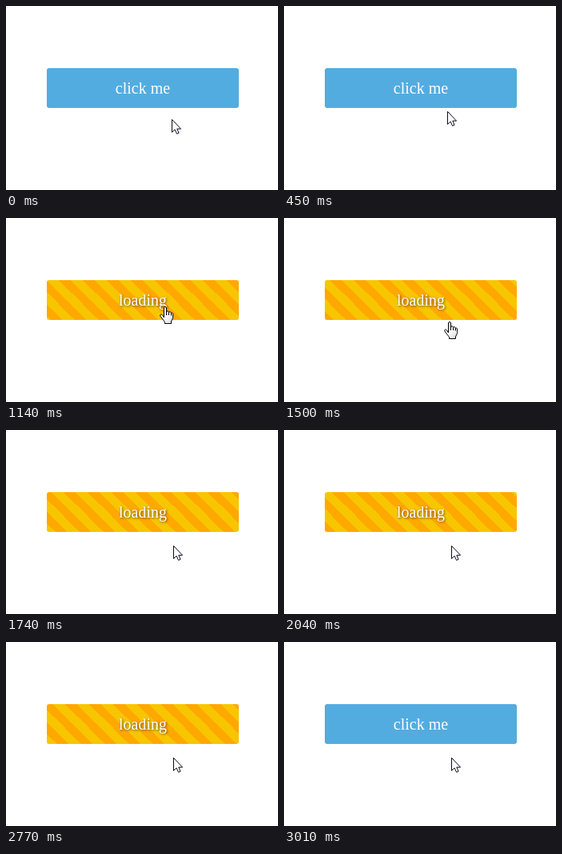
Write an HTML page that moves like this. It is 340 by 231 pixels and loops after 4010 ms.

```html
<!DOCTYPE html>
<html lang="en">
<head>
<meta charset="utf-8">
<title>Loading button</title>
<style>
html, body { margin: 0; width: 100%; height: 100%; overflow: hidden; background: #fff; }
#button {
  position: absolute; left: 51px; top: 78px; width: 240px; height: 50px;
  border-radius: 3px; background-color: #53acdf;
  color: #fff; font: 20px/50px "Liberation Serif", "Times New Roman", serif; text-align: center;
}
#button.busy {
  background-color: #ffa800;
  background-image: linear-gradient(45deg, #f7c600 25%, transparent 25%, transparent 50%,
    #f7c600 50%, #f7c600 75%, transparent 75%, transparent);
  background-size: 30px 30px;
  text-shadow: 1px 1px 3px rgba(0, 0, 0, .6);
}
svg { position: absolute; left: 0; top: 0; overflow: visible; }
</style>
</head>
<body>
<div id="button">click me</div>
<svg id="arrow" width="13" height="20">
  <path d="M.5 .5V16.5L4.1 13.1L6.6 18.5L9.1 17.4L6.8 12.2H11.6Z" fill="#fff" stroke="#0c0a1c" stroke-linejoin="round"/>
</svg>
<svg id="hand" width="18" height="23">
  <defs>
    <linearGradient id="skin" x1="0" y1="0" x2="1" y2="1">
      <stop offset=".5" stop-color="#fff"/><stop offset="1" stop-color="#d4d4dc"/>
    </linearGradient>
  </defs>
  <path d="M5.5 14V2Q5.5 .5 7 .5T8.5 2V7Q8.7 5.7 10.2 5.9T11.5 7.6Q11.9 6.5 13.2 6.8T14.4 8.7Q14.8 7.8 15.8 8.2T16.7 9.8V14.5L14.5 19V21.5H6.5V19.5L3 15L.8 12Q.3 10.5 1.6 10.1T3.6 11Z" fill="url(#skin)" stroke="#000" stroke-linejoin="round"/>
  <path d="M8.5 6.5V11M11.5 7.5V11M14.5 8.5V11.5" fill="none" stroke="#000"/>
</svg>
<script>
const LOOP = 4010, CLICK = 1140, DONE = 3010, SPIN = 500, TILE = 30;
const button = document.getElementById("button");
const arrow = document.getElementById("arrow");
const hand = document.getElementById("hand");

// pointer hot spot: time, x, y
const path = [[270, 207, 142], [810, 198, 111], [1200, 198, 111], [1500, 206, 130], [1620, 208, 138], [1740, 209, 145]];

function pointerAt(t) {
  if (t < path[0][0]) return path[0].slice(1);
  for (let i = 1; i < path.length; i++) {
    const [t0, x0, y0] = path[i - 1], [t1, x1, y1] = path[i];
    if (t < t1) {
      const k = (t - t0) / (t1 - t0);
      return [x0 + (x1 - x0) * k, y0 + (y1 - y0) * k].map(Math.round);
    }
  }
  return path[path.length - 1].slice(1);
}

// the picture advances in 60 ms steps with a few longer holds
function snap(t) {
  const starts = [0, 330, 1140, 1680, 2170, 2230, 2770];
  const last = [0, 810, 1620, 2040, 2170, 2710, 3010];
  let i = starts.length - 1;
  while (starts[i] > t) i--;
  return Math.min(starts[i] + Math.floor((t - starts[i]) / 60) * 60, last[i]);
}

function draw(t) {
  const busy = t >= CLICK && t < DONE;
  button.className = busy ? "busy" : "";
  const label = busy ? "loading" : "click me";
  if (button.textContent !== label) button.textContent = label;
  button.style.backgroundPosition = (t - CLICK) / SPIN % 1 * TILE + "px 0";

  const [x, y] = pointerAt(t);
  const over = t < CLICK ? y < 128 : t < 1560;
  arrow.style.display = over ? "none" : "";
  hand.style.display = over ? "" : "none";
  arrow.style.transform = `translate(${x}px, ${y}px)`;
  hand.style.transform = `translate(${x - 6}px, ${y}px)`;
}

const begin = performance.now();
function tick() {
  draw(snap((performance.now() - begin) % LOOP));
  requestAnimationFrame(tick);
}
tick();
</script>
</body>
</html>
```
